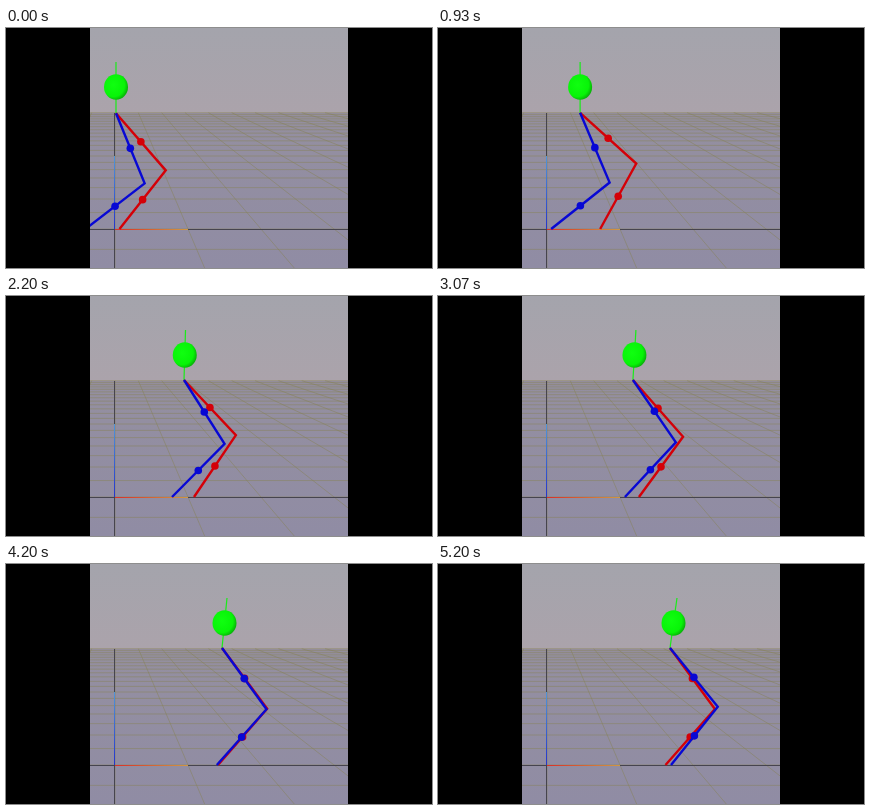
Write an HTML page that moves like this. It is 426 by 240 pixels and loops after 5270 ms.

```html
<!DOCTYPE html>
<html lang="en">
<head>
<meta charset="utf-8">
<title>Walker</title>
<style>
  html, body { margin: 0; width: 100%; height: 100%; overflow: hidden; background: #000; }
  svg { display: block; width: 100vw; height: 100vh; }
</style>
</head>
<body>
<svg viewBox="0 0 426 240">
  <defs>
    <clipPath id="view"><rect x="84" width="258" height="240"/></clipPath>
    <linearGradient id="sky" x2="0" y2="1">
      <stop stop-color="#a4a4ac"/><stop offset="1" stop-color="#aba3ab"/>
    </linearGradient>
    <linearGradient id="floor" x2="0" y2="1">
      <stop stop-color="#948fa0"/><stop offset="1" stop-color="#908ca4"/>
    </linearGradient>
    <radialGradient id="ball" cx=".4" cy=".42" r=".65">
      <stop stop-color="#10ff10"/><stop offset=".7" stop-color="#08f408"/><stop offset=".95" stop-color="#08b008"/>
    </radialGradient>
    <linearGradient id="xAxis">
      <stop stop-color="#d83028"/><stop offset="1" stop-color="#d09840"/>
    </linearGradient>
    <linearGradient id="zAxis" x2="0" y2="1">
      <stop stop-color="#5096d8"/><stop offset="1" stop-color="#2434cc"/>
    </linearGradient>
  </defs>
  <rect width="426" height="240"/>
  <g clip-path="url(#view)">
    <rect x="84" width="258" height="86" fill="url(#sky)"/>
    <rect x="84" y="85" width="258" height="155" fill="url(#floor)"/>
    <path id="grid" fill="none" stroke="#858052" stroke-width=".8" opacity=".6"/>
    <path d="M84 201.5H342M108.5 85V240" stroke="#46444e"/>
    <rect x="109" y="201" width="73" height="1" fill="url(#xAxis)"/>
    <rect x="108" y="128" width="1" height="73" fill="url(#zAxis)"/>
    <path id="torso" stroke="#18ec18" stroke-width="1.2"/>
    <ellipse id="head" cy="59" rx="12" ry="12.8" fill="url(#ball)"/>
    <g id="legs"></g>
  </g>
</svg>
<script>
const LOOP = 5270, FPS = 15;
const FOOT_Y = 201, THIGH = 75.7, SHIN = 74.7;
const ORIGIN_X = 109, VANISH_Y = 30, CELL = 73, CAMERA = 4.7;

const keyTimes = [0, 930, 1400, 2200, 3070, 4200, 5200];
const tracks = {
  hipX: [110, 142, 156.5, 178, 195, 216, 232],
  hipY: [85.3, 84.8, 84.3, 84, 84, 84, 84],
  red: [113.5, 162, 181, 188, 201, 212, 227.5],
  blue: [79.5, 113, 140, 166, 187, 210.8, 233],
  lean: [0, 0, 0, 1.5, 3, 5, 7]
};

const byId = id => document.getElementById(id);

function make(tag, parent, attrs) {
  const el = document.createElementNS("http://www.w3.org/2000/svg", tag);
  setAttrs(el, attrs);
  return parent.appendChild(el);
}

function setAttrs(el, attrs) {
  for (const name in attrs) el.setAttribute(name, attrs[name]);
}

function slopeAt(values, i) {
  const a = Math.max(i - 1, 0), b = Math.min(i + 1, values.length - 1);
  return (values[b] - values[a]) / (keyTimes[b] - keyTimes[a]);
}

// Cubic Hermite curve through the key poses.
function sample(values, t) {
  let i = 0;
  while (i < keyTimes.length - 2 && t > keyTimes[i + 1]) i++;
  const span = keyTimes[i + 1] - keyTimes[i];
  const u = Math.min((t - keyTimes[i]) / span, 1), v = 1 - u;
  return values[i] * v * v * (1 + 2 * u) + values[i + 1] * u * u * (3 - 2 * u)
    + span * u * v * (slopeAt(values, i) * v - slopeAt(values, i + 1) * u);
}

function gridPath() {
  const scaleAt = depth => CAMERA / (CAMERA + depth);
  const rowY = depth => VANISH_Y + (FOOT_Y - VANISH_Y) * scaleAt(depth);
  const far = 10, near = -1.5;
  let d = "";
  for (let depth = near; depth <= far; depth += .5) d += `M84 ${rowY(depth)}H342`;
  for (let k = -2; k <= 10; k++) {
    const x = depth => ORIGIN_X + k * CELL * scaleAt(depth);
    d += `M${x(far)} ${rowY(far)}L${x(near)} ${rowY(near)}`;
  }
  return d;
}

function makeLeg(color) {
  const group = make("g", byId("legs"), { fill: color, stroke: color });
  return {
    line: make("path", group, { fill: "none", "stroke-width": 2.4 }),
    masses: [0, 1].map(() => make("circle", group, { r: 3.8, stroke: "none" }))
  };
}

function kneeOf(hipX, hipY, footX) {
  const dx = footX - hipX, dy = FOOT_Y - hipY, dist = Math.hypot(dx, dy);
  const along = (THIGH ** 2 - SHIN ** 2 + dist ** 2) / (2 * dist);
  const out = Math.sqrt(THIGH ** 2 - along ** 2);
  return [hipX + (along * dx + out * dy) / dist, hipY + (along * dy - out * dx) / dist];
}

function poseLeg(leg, hipX, hipY, footX) {
  const [x, y] = kneeOf(hipX, hipY, footX);
  leg.line.setAttribute("d", `M${hipX} ${hipY}L${x} ${y}L${footX} ${FOOT_Y}`);
  setAttrs(leg.masses[0], { cx: (hipX + x) / 2, cy: (hipY + y) / 2 });
  setAttrs(leg.masses[1], { cx: (footX + x) / 2, cy: (FOOT_Y + y) / 2 });
}

byId("grid").setAttribute("d", gridPath());
const redLeg = makeLeg("#d40008"), blueLeg = makeLeg("#0808d4");

function draw(time) {
  const step = 1000 / FPS;
  const t = Math.floor((time % LOOP + 4) / step) * step;
  const hipX = sample(tracks.hipX, t), hipY = sample(tracks.hipY, t);
  const lean = sample(tracks.lean, t);
  byId("torso").setAttribute("d", `M${hipX} ${hipY}L${hipX + lean} 34`);
  byId("head").setAttribute("cx", hipX + lean / 2);
  poseLeg(redLeg, hipX, hipY, sample(tracks.red, t));
  poseLeg(blueLeg, hipX, hipY, sample(tracks.blue, t));
}

const start = performance.now();
function tick() {
  draw(performance.now() - start);
  requestAnimationFrame(tick);
}
tick();
</script>
</body>
</html>
```
